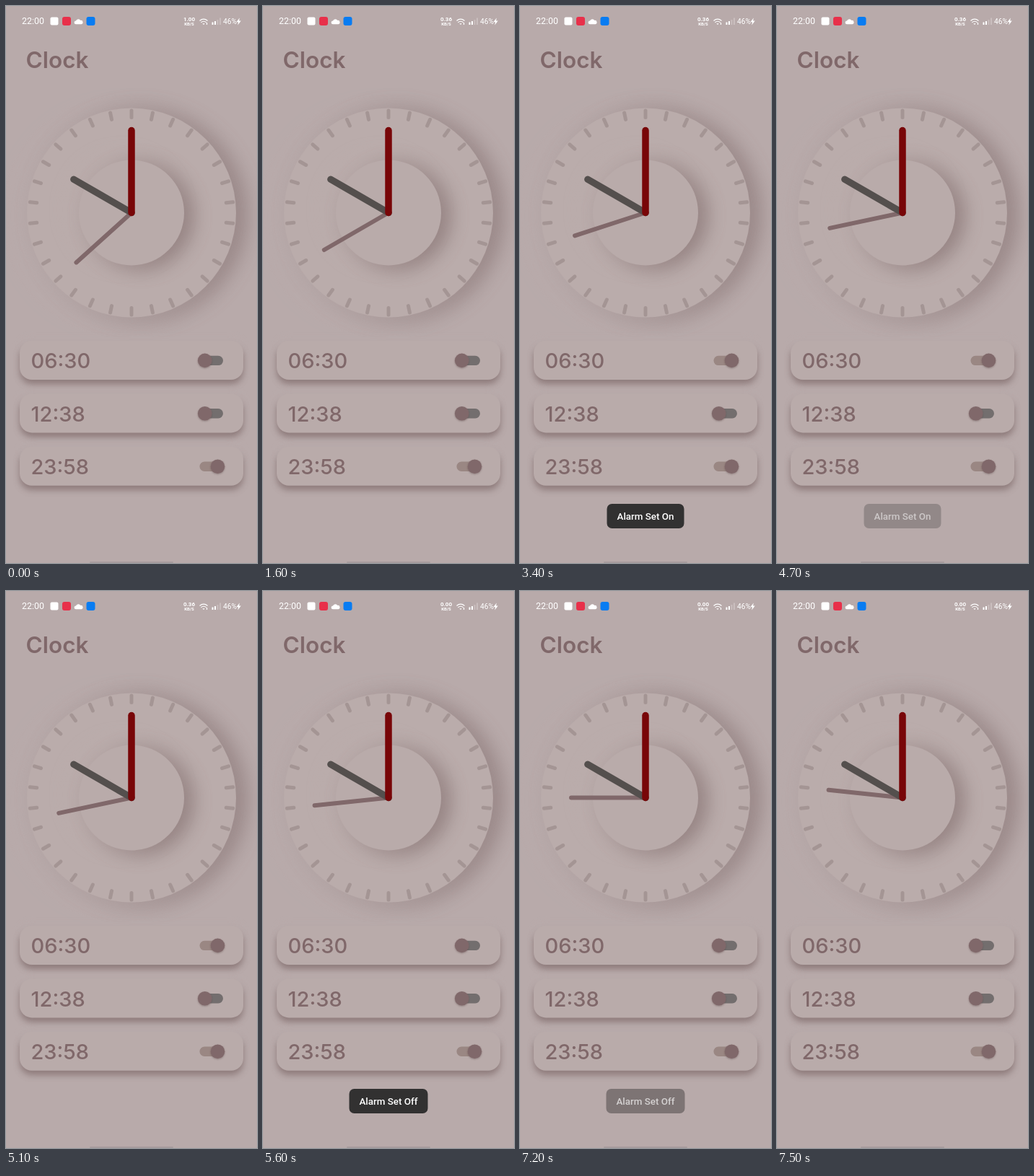
These frames come from a looping animation (348 px wide and 772 px high, 7.7 s). An HTML page:

```html
<!DOCTYPE html>
<html lang="en">
<head>
<meta charset="utf-8">
<title>Clock</title>
<style>
  html, body { margin: 0; width: 100%; height: 100%; overflow: hidden; background: #b8aaaa; }
  svg { display: block; width: 100vw; height: 100vh; }
  text { white-space: pre; }
  .ui { font-family: Roboto, "Noto Sans", sans-serif; fill: #fff; }
  .display { font-family: Inter, "Open Sans", sans-serif; fill: #80686a; }
</style>
</head>
<body>
<svg id="stage" viewBox="0 0 348 772">
  <defs>
    <filter id="soft" x="-40%" y="-40%" width="180%" height="180%"><feGaussianBlur stdDeviation="15"/></filter>
    <filter id="softInner" x="-60%" y="-60%" width="220%" height="220%"><feGaussianBlur stdDeviation="14"/></filter>
    <filter id="cardBlur" x="-10%" y="-50%" width="120%" height="200%"><feGaussianBlur stdDeviation="5"/></filter>
    <filter id="thumbShadow" x="-30%" y="-30%" width="160%" height="170%">
      <feDropShadow dx="0" dy="1" stdDeviation="1" flood-color="#4a3838" flood-opacity=".4"/>
    </filter>
  </defs>
  <rect width="348" height="772" fill="#b8aaaa"/>
  <g id="status" class="ui">
    <text x="22" y="25" font-size="12.4">22:00</text>
    <rect x="61.500" y="15.500" width="11" height="11" rx="2"/>
    <rect x="78" y="15" width="12" height="12" rx="3" fill="#e8304a"/>
    <path d="M97 25.300a2.400 2.400 0 0 1 0-4.800a3.600 3.600 0 0 1 6.400-.600a2.700 2.700 0 0 1 .8 5.400z"/>
    <rect x="111.500" y="15" width="12" height="12" rx="3" fill="#087cf2"/>
    <g text-anchor="middle" font-weight="700">
      <text id="speed" x="254" y="21.300" font-size="8"></text>
      <text x="254" y="27" font-size="6">KB/S</text>
    </g>
    <g fill="none" stroke="#fff" stroke-width="1.200">
      <path d="M268.500 20.500q5.500-4.600 11 0M270.400 22.700q3.600-2.900 7.200 0"/>
      <path d="M272.300 24.200h3.400l-1.700 1.700z" fill="#fff" stroke="none"/>
      <path d="M278.500 23v3"/>
    </g>
    <path d="M285.500 22.500h2v3.500h-2zM289 21h2v5h-2z"/>
    <path d="M292.500 19h2v7h-2zM296 16.500h2v9.500h-2z" opacity=".25"/>
    <text x="301" y="25" font-size="10.200">46%</text>
    <path d="M323.800 16.500l-4.300 5.700h2.600l-.8 4.300l4.500-5.900h-2.700z"/>
  </g>
  <text class="display" x="27.500" y="85.500" font-size="31.500" font-weight="600">Clock</text>

  <circle cx="187" cy="289" r="145" fill="#644c4c" opacity=".43" filter="url(#soft)"/>
  <circle cx="160" cy="291" r="145" fill="#b8aaaa" opacity=".7" filter="url(#soft)"/>
  <circle cx="174" cy="286.500" r="145" fill="#baacab"/>
  <g id="ticks" stroke="#a49594" stroke-width="5" stroke-linecap="round"></g>
  <circle cx="186" cy="291" r="73" fill="#644c4c" opacity=".48" filter="url(#softInner)"/>
  <circle cx="162" cy="282" r="73" fill="#b9abaa" opacity=".5" filter="url(#softInner)"/>
  <circle cx="174" cy="286.500" r="73" fill="#b9abaa"/>
  <g id="hands" stroke-linecap="round"></g>

  <g id="cards"></g>
  <g id="toast" class="ui">
    <rect id="toastBox" y="690" height="34" rx="7" fill="#323131"/>
    <text id="toastText" x="174" y="712" text-anchor="middle" font-size="13.400" font-weight="500"></text>
  </g>
  <rect x="116" y="770" width="116" height="2" rx="1" fill="#a79b9d"/>
</svg>
<script>
const LOOP = 7700, STEP = 100;
const CENTER = { x: 174, y: 286.5 };
const TICK_TIMES = [500, 1400, 2500, 3400, 4400, 5400, 6500, 7500];
const ALARM_ON = 2200, ALARM_OFF = 5200;
const $ = id => document.getElementById(id);

function add(parent, tag, attrs, text) {
  const el = document.createElementNS('http://www.w3.org/2000/svg', tag);
  for (const key in attrs) el.setAttribute(key, attrs[key]);
  if (text) el.textContent = text;
  return parent.appendChild(el);
}

const turn = deg => `rotate(${deg} ${CENTER.x} ${CENTER.y})`;

function spoke(parent, from, to, deg, attrs = {}) {
  return add(parent, 'line', {
    x1: CENTER.x, x2: CENTER.x, y1: CENTER.y - from, y2: CENTER.y - to,
    transform: turn(deg), ...attrs
  });
}

for (let deg = 0; deg < 360; deg += 12) spoke($('ticks'), 132, 141.5, deg);

const secondHand = spoke($('hands'), 0, 103, 0, { stroke: '#80686a', 'stroke-width': 6 });
spoke($('hands'), 0, 92.5, 300, { stroke: '#544f4d', 'stroke-width': 9.5 });
spoke($('hands'), 0, 114, 0, { stroke: '#780608', 'stroke-width': 9.5 });

function makeCard(label, top) {
  const g = add($('cards'), 'g', { transform: `translate(0 ${top})` });
  const box = { x: 19, width: 310, height: 54, rx: 17 };
  add(g, 'rect', { ...box, y: 6, fill: '#644c4c', opacity: 0.5, filter: 'url(#cardBlur)' });
  add(g, 'rect', { ...box, y: -5, height: 24, fill: '#b8aaaa', opacity: 0.8, filter: 'url(#cardBlur)' });
  add(g, 'rect', { ...box, y: 0, fill: '#b9abaa' });
  add(g, 'text', { x: 34.5, y: 38.3, class: 'display', 'font-size': 29, 'font-weight': 500 }, label);
  const track = add(g, 'rect', { x: 268.5, y: 20.7, width: 32.5, height: 13.4, rx: 6.7 });
  const thumb = add(g, 'circle', { cy: 27.4, r: 9.8, fill: '#80686a', filter: 'url(#thumbShadow)' });
  return on => {
    track.setAttribute('fill', on ? '#9a8783' : '#736e6e');
    thumb.setAttribute('cx', on ? 293.5 : 275.7);
  };
}

const [setMorning, setNoon, setNight] =
  ['06:30', '12:38', '23:58'].map((label, i) => makeCard(label, 464 + i * 73.4));
setNoon(false);
setNight(true);

const ramp = (t, from, to) => Math.min(1, Math.max(0, (t - from) / (to - from)));
const fade = (t, inStart, inEnd, outStart, outEnd) =>
  ramp(t, inStart, inEnd) * (1 - ramp(t, outStart, outEnd));

function render(t) {
  const seconds = 38 + TICK_TIMES.filter(at => t >= at).length;
  secondHand.setAttribute('transform', turn(seconds * 6));
  $('speed').textContent = t < 1400 ? '1.00' : t < 5400 ? '0.36' : '0.00';
  setMorning(t >= ALARM_ON && t < ALARM_OFF);

  const off = t >= ALARM_OFF;
  const width = off ? 109 : 107;
  $('toastText').textContent = off ? 'Alarm Set Off' : 'Alarm Set On';
  $('toastBox').setAttribute('x', 174 - width / 2);
  $('toastBox').setAttribute('width', width);
  const alpha = off ? fade(t, 5200, 5600, 6950, 7400) : fade(t, 2400, 2900, 4400, 4820);
  $('toastBox').setAttribute('opacity', alpha);
  $('toastText').setAttribute('opacity', Math.sqrt(alpha));
}

const start = performance.now();
function frame() {
  const t = (performance.now() - start) % LOOP;
  render(Math.floor(t / STEP) * STEP);
  requestAnimationFrame(frame);
}
frame();
</script>
</body>
</html>
```
